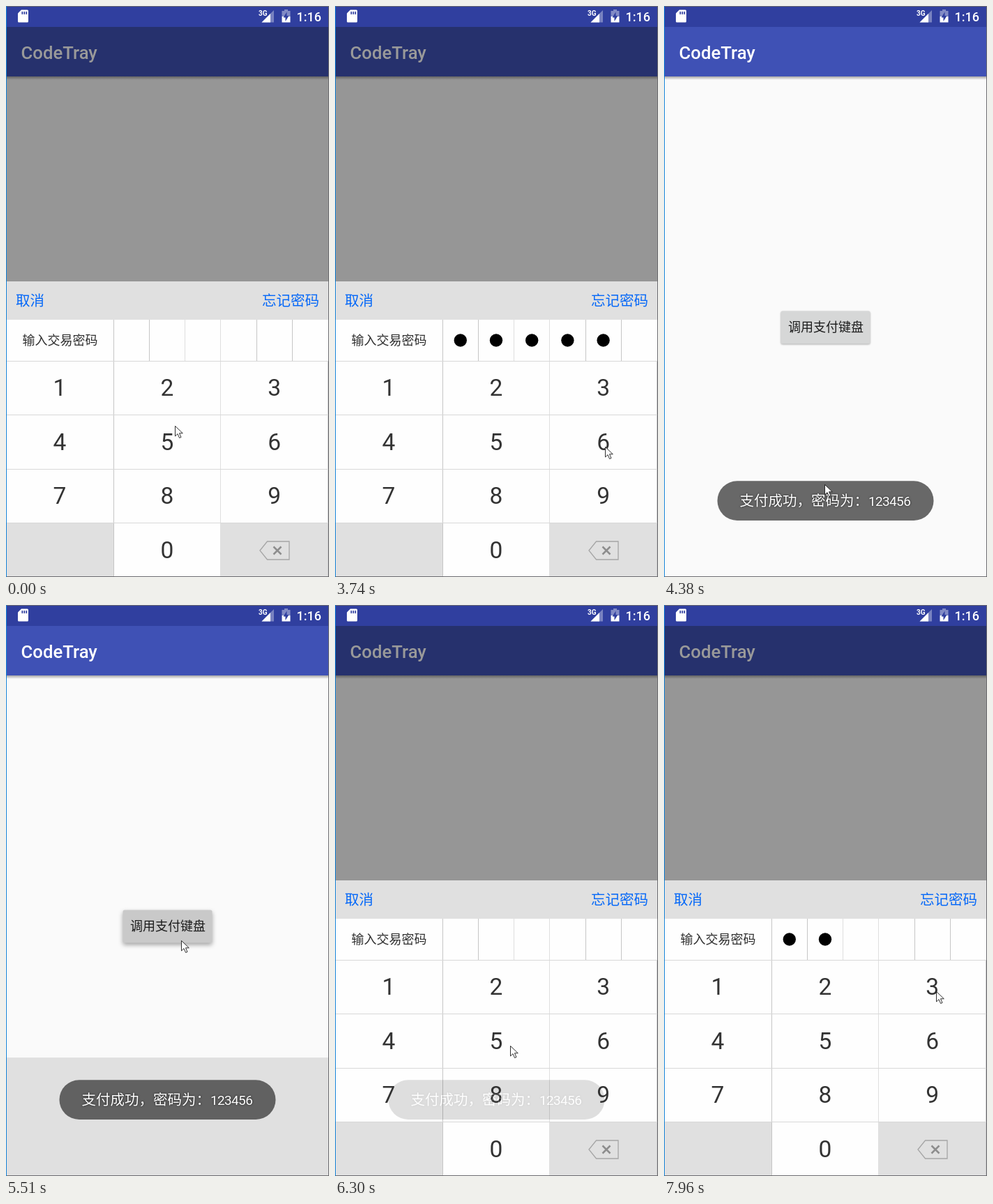
Animation, 463 px wide and 819 px high, one loop 8 s. Source, as an HTML page:

```html
<!DOCTYPE html>
<html lang="zh-CN">
<head>
<meta charset="utf-8">
<title>Payment keypad</title>
<style>
  html, body { margin: 0; width: 100%; height: 100%; overflow: hidden; background: #fafafa; }
  svg { display: block; width: 463px; height: 819px; }
  text { font-family: Roboto, "Noto Sans CJK SC", "Noto Sans CJK", sans-serif; }
  .medium { font-weight: 500; fill: #fff; }
  .mid { text-anchor: middle; }
  .link { font-size: 20.5px; fill: #0568f8; }
  .label { font-size: 18px; fill: #2e2e2e; }
  .key { font-size: 33.5px; fill: #333; text-anchor: middle; }
  .toast { font-size: 20.5px; fill: #fff; text-shadow: 0 0 3px rgba(0,0,0,.7); }
  .digits { font-size: 19px; letter-spacing: -.65px; }
  #button { fill: #d6d7d7; filter: drop-shadow(0 1px 1px rgba(0,0,0,.3)); }
  #button.down { fill: #c9c9c9; filter: drop-shadow(0 3px 3px rgba(0,0,0,.35)); }
</style>
</head>
<body>
<svg viewBox="0 0 463 819">
  <defs>
    <linearGradient id="shade" x1="0" y1="0" x2="0" y2="1">
      <stop offset="0" stop-color="#000" stop-opacity=".34"/>
      <stop offset="1" stop-color="#000" stop-opacity="0"/>
    </linearGradient>
  </defs>

  <rect width="463" height="819" fill="#fafafa"/>
  <rect y="101" width="463" height="5" fill="url(#shade)"/>
  <rect y="30" width="463" height="71" fill="#3f51b5"/>
  <text class="medium" x="21.5" y="76" font-size="25.7">CodeTray</text>
  <rect id="button" x="167.5" y="437.5" width="128" height="47" rx="2.5"/>
  <text class="label mid" x="232" y="467" style="fill:#1c1c1c">调用支付键盘</text>

  <rect id="dim" y="30" width="463" height="789" fill="#000"/>

  <!-- status bar -->
  <rect width="463" height="30" fill="#303f9f"/>
  <g fill="#fff">
    <path d="M22 5.5h8.500q1.500 0 1.500 1.500v15q0 1.500-1.500 1.500h-12q-1.500 0-1.500-1.500v-11.500z"/>
    <path d="M22.500 8h1.700v4h-1.700zM25.500 8h1.700v4h-1.700zM28.500 8h1.700v4h-1.700z" fill="#303f9f"/>
    <path d="M384 6v17.500h-17.500z" opacity=".35"/>
    <path d="M379 11v12.500h-12.500z"/>
    <path d="M399 5h5v2h3.500v8h-12v-8h3.500z" opacity=".4"/>
    <path d="M395.500 15h12v8.500h-12z"/>
    <path d="M402.500 8.500v5.500h3l-5 8v-5.500h-3z" fill="#303f9f"/>
  </g>
  <text x="362" y="14" font-size="10" font-weight="700" fill="#fff">3G</text>
  <text class="medium" x="416.500" y="21.500" font-size="18">1:16</text>

  <g id="panel">
    <rect y="395" width="463" height="424" fill="#e0e0e0"/>
    <g id="content">
      <text class="link" x="14" y="430">取消</text>
      <text class="link" x="367" y="430">忘记密码</text>
      <path d="M0 450h463v292h-463zM155 742h153v77h-153z" fill="#fefefe"/>
      <g id="lines"></g>
      <text class="label mid" x="77.500" y="486">输入交易密码</text>
      <g id="dots"></g>
      <g id="keys"></g>
      <path d="M364 781l10.500-13h31.500v26h-31.500z" fill="none" stroke="#a6a6a6" stroke-width="1.300"/>
      <path d="M383.500 775.500l11 11m0-11l-11 11" stroke="#8d8d8d" stroke-width="2.500"/>
    </g>
  </g>

  <g id="toast">
    <rect x="76.500" y="681.300" width="310" height="56.700" rx="28.300" fill="#343434" fill-opacity=".73"/>
    <text class="toast" x="108.500" y="717">支付成功，密码为：</text>
    <text class="toast digits" x="293" y="717">123456</text>
  </g>

  <!-- window frame -->
  <path d="M0 .5h463M462.500 0v819M0 818.500h463" stroke="#6c6c70"/>
  <path d="M.5 0v819" stroke="#1583d8"/>

  <path id="cursor" d="M.5 .5V15L4 11.700L6.600 17.500L9 16.500L6.500 10.800H11.300Z"
        fill="#fff" stroke="#1a1a1a" stroke-width=".9"/>
</svg>

<script>
const LOOP = 8000, FRAME = 132;
const CLOSE = 4120, OPEN = 5390;
const $ = id => document.getElementById(id);

function add(parent, tag, attrs, text) {
  const el = document.createElementNS("http://www.w3.org/2000/svg", tag);
  for (const name in attrs) el.setAttribute(name, attrs[name]);
  if (text) el.textContent = text;
  $(parent).appendChild(el);
  return el;
}

const rule = (x, y, width, height, fill) => add("lines", "rect", { x, y, width, height, fill });
const dots = [];
for (let i = 0; i < 6; i++) {
  const fill = Math.abs(i - 2.5) < 1 ? "#dedede" : "#c6c6c6";
  rule(Math.floor(154 + i * 51.3), 450, 1, i % 3 ? 59 : 368, fill);
  dots.push(add("dots", "circle", { cx: 179.8 + i * 51.2, cy: 479.5, r: 9.2 }));
}
rule(461, 510, 1, 308, "#c6c6c6");
for (let i = 0; i < 4; i++) rule(0, Math.floor(509 + i * 77.5), 463, 1, "#d8d8d8");

[..."123456789 0"].forEach((digit, i) =>
  add("keys", "text", { class: "key", x: 77 + i % 3 * 153.8, y: 559 + Math.floor(i / 3) * 77.5 }, digit));

// Cursor moves: start, end, x, y, sideways bow
const moves = [
  [0, 0, 242, 602],
  [140, 660, 113, 550],
  [1060, 1190, 228, 550],
  [1490, 1760, 401, 550],
  [2160, 2630, 80, 645],
  [2840, 3100, 236, 640],
  [3350, 3740, 387, 632],
  [3990, 4380, 230, 686],
  [4530, 5090, 251, 481, 112],
  [5900, 6300, 251, 632],
  [6880, 7146, 234, 790],
  [7410, 7810, 401, 628],
  [7960, LOOP, 390, 554]
];
const taps = [1060, 1490, 2160, 2840, 3350, 3990, 6450, 7410];

// Progress 0..1 in screen updates; the first update lands on the start time
function ramp(t, from, to) {
  const n = Math.round((to - from) / FRAME);
  const step = Math.floor((t - from) * n / (to - from || 1) + 1.001);
  return t < from ? 0 : Math.min(step / (n + 1), 1);
}
const smooth = p => p * p * (3 - 2 * p);
const easeOut = (p, power) => 1 - (1 - p) ** power;

function cursorAt(t) {
  let x = 0, y = 0;
  for (const [from, to, toX, toY, bow = 0] of moves) {
    const p = smooth(ramp(t, from, to));
    x += (toX - x) * p + bow * Math.sin(Math.PI * p);
    y += (toY - y) * p;
  }
  return [Math.round(x), Math.round(y)];
}

function draw(t) {
  const hidden = ramp(t, CLOSE, CLOSE + 130);
  const raised = easeOut(ramp(t, OPEN + 120, OPEN + 510), 1.78);
  const dim = .4 * (1 - hidden + ramp(t, OPEN + 250, OPEN + 380));
  const toast = ramp(t, CLOSE, CLOSE + 260) - easeOut(ramp(t, 6170, 6430), 1.4);
  const count = taps.filter(tap => tap <= t && (t < OPEN || tap > OPEN)).length;

  $("cursor").setAttribute("transform", `translate(${cursorAt(t)})`);
  $("panel").setAttribute("transform", `translate(0 ${424 * (hidden - raised)})`);
  $("content").setAttribute("opacity", dim > 0 ? 1 : 0);
  $("dim").setAttribute("opacity", dim);
  $("toast").setAttribute("opacity", toast);
  $("button").setAttribute("class", t >= OPEN ? "down" : "");
  dots.forEach((dot, i) => dot.setAttribute("opacity", i < count ? 1 : 0));
}

const start = performance.now();
function loop() {
  draw((performance.now() - start) % LOOP);
  requestAnimationFrame(loop);
}
loop();
</script>
</body>
</html>
```
